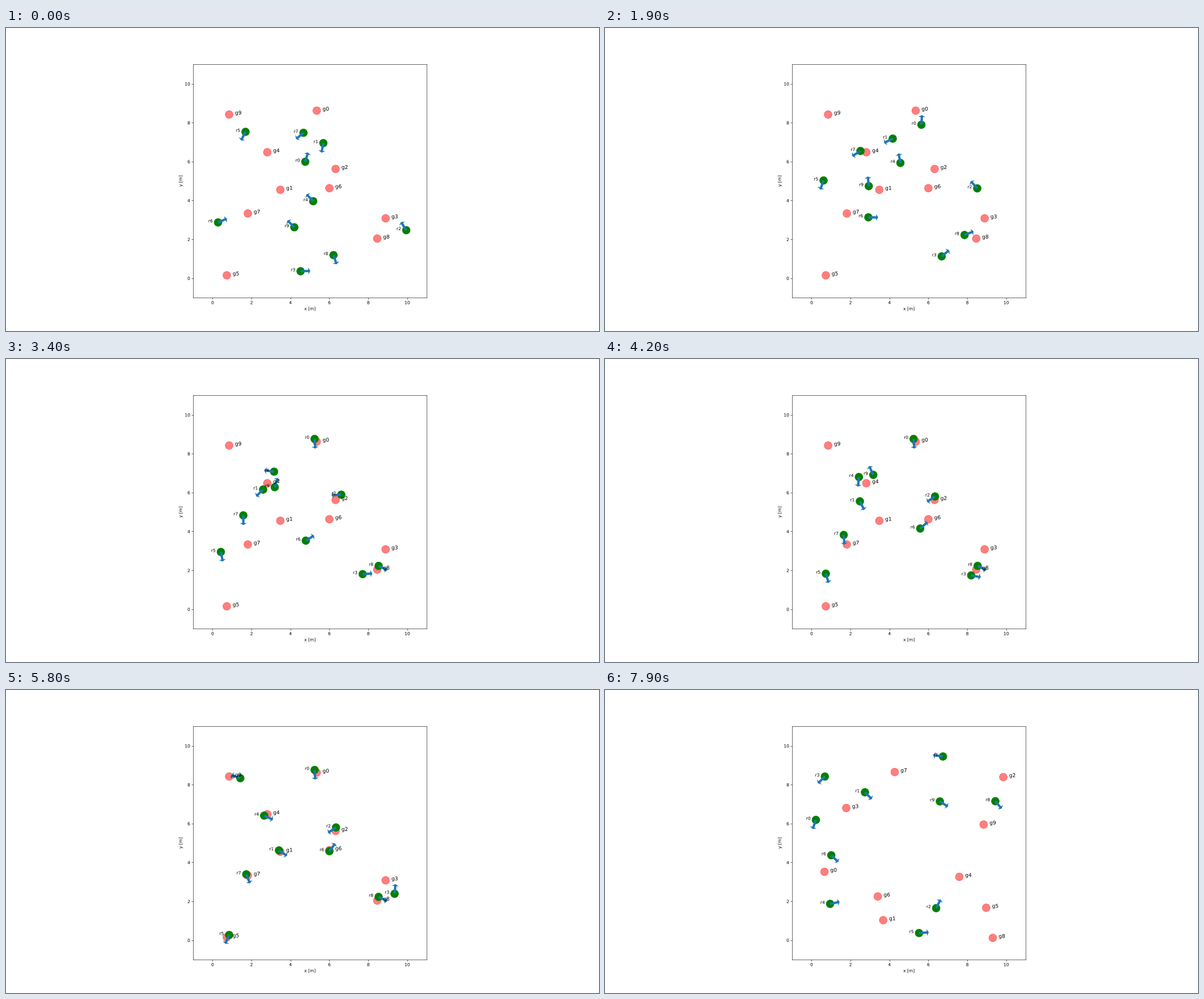
Write a matplotlib script that moves like this. It is 1046 px wide and 535 px high and loops after 8000 ms.

```python
import numpy as np
import matplotlib.pyplot as plt
from matplotlib.animation import FuncAnimation
from matplotlib.patches import Circle, Polygon
from matplotlib.patheffects import Normal
from matplotlib.text import Text

W, H, DPI = 1046, 535, 54.48
FRAMES, STEP = 80, 100
RESET = 75             # frame at which the second round starts
SPEED = 0.14           # metres per frame
KEYS = 0, 9, 27, 42, 58   # frames at which every moving robot passes its points
MIN_STOP = 4           # shortest final leg, in frames

RADIUS, ARROW_LEN, ARROW_WIDTH = 0.2, 0.5, 0.6

plt.rcParams.update({"font.family": "DejaVu Sans", "text.hinting": "no_hinting"})


def unit(deg):
    a = np.radians(deg)
    return np.array([np.cos(a), np.sin(a)])


def spline_slopes(t, p, first, last):
    """Velocities at the knots of a C2 cubic spline with fixed end velocities."""
    n = len(t)
    w = 1 / np.diff(t)
    pull = 3 * np.diff(p, axis=0) * w[:, None] ** 2
    a, b = np.eye(n), np.zeros((n, 2))
    b[0], b[-1] = first, last
    for i in range(1, n - 1):
        a[i, i - 1:i + 2] = w[i - 1], 2 * (w[i - 1] + w[i]), w[i]
        b[i] = pull[i - 1] + pull[i]
    return np.linalg.solve(a, b)


def drive(start, turn_from, *via, stop, turn_to):
    """Smooth drive that leaves and arrives with the given headings, then waits."""
    p = np.array([start, *via, stop], float)
    t = np.array(KEYS[:len(p) - 1], float)
    last_leg = np.hypot(*(p[-1] - p[-2])) / SPEED
    t = np.append(t, t[-1] + max(last_leg, MIN_STOP))
    v = spline_slopes(t, p, SPEED * unit(turn_from), SPEED * unit(turn_to))

    def pose(frame):
        frame = min(frame, t[-1])
        i = min(np.searchsorted(t, frame, side="right") - 1, len(t) - 2)
        h = t[i + 1] - t[i]
        u = (frame - t[i]) / h
        step, m, n = p[i + 1] - p[i], h * v[i], h * v[i + 1]
        c2, c3 = 3 * step - 2 * m - n, m + n - 2 * step
        dx, dy = m + u * (2 * c2 + 3 * u * c3)
        return p[i] + u * (m + u * (c2 + u * c3)), np.degrees(np.arctan2(dy, dx))

    return pose


def straight(x, y, heading):
    """Straight drive that reaches (x, y) on the last frame."""
    def pose(frame):
        return (x, y) - SPEED * (FRAMES - 1 - frame) * unit(heading), heading

    return pose


goals_a = [(5.35, 8.62), (3.48, 4.55), (6.32, 5.62), (8.89, 3.08), (2.81, 6.48),
           (0.73, 0.15), (6.00, 4.63), (1.81, 3.33), (8.46, 2.04), (0.85, 8.42)]
robots_a = [
    drive((4.76, 5.99), 74, (5.27, 6.67), (5.43, 8.80), stop=(5.24, 8.76), turn_to=274),
    drive((5.69, 6.95), 259, (5.20, 7.22), (3.24, 6.61), (2.48, 5.55),
          stop=(3.41, 4.62), turn_to=326),
    drive((9.95, 2.47), 122, (9.35, 3.50), (7.58, 5.46), stop=(6.34, 5.80), turn_to=214),
    drive((4.52, 0.36), 2, (5.64, 0.48), (7.32, 1.65), (8.20, 1.74), (9.35, 2.39),
          stop=(9.06, 3.16), turn_to=170),
    drive((5.17, 3.96), 134, (4.67, 4.84), (4.11, 6.70), (2.43, 6.80),
          stop=(2.65, 6.41), turn_to=335),
    drive((1.69, 7.53), 243, (1.19, 6.39), (0.35, 3.91), (0.73, 1.83),
          stop=(0.85, 0.27), turn_to=246),
    drive((0.28, 2.87), 23, (1.45, 3.14), (4.02, 3.21), (5.58, 4.15),
          stop=(6.00, 4.58), turn_to=53),
    drive((4.67, 7.48), 220, (3.76, 7.08), (1.75, 5.76), (1.65, 3.82),
          stop=(1.73, 3.39), turn_to=292),
    drive((6.21, 1.19), -71, (6.67, 1.25), stop=(8.53, 2.23), turn_to=-27),
    drive((4.20, 2.62), 135, (3.36, 3.50), (2.99, 5.68), (3.17, 6.91),
          stop=(1.04, 8.44), turn_to=170),
]

goals_b = [(0.66, 3.52), (3.68, 1.03), (9.85, 8.39), (1.78, 6.80), (7.59, 3.26),
           (8.97, 1.67), (3.40, 2.25), (4.27, 8.65), (9.31, 0.12), (8.84, 5.95)]
robots_b = [
    straight(0.22, 6.19, 251), straight(2.74, 7.61, -45), straight(6.40, 1.65, 63),
    straight(0.68, 8.42, 225), straight(0.95, 1.87, 12), straight(5.52, 0.37, 4),
    straight(1.01, 4.37, -44), straight(6.75, 9.45, 172), straight(9.44, 7.15, -50),
    straight(6.59, 7.14, -33),
]

fig = plt.figure(figsize=((W + .01) / DPI, (H + .01) / DPI), dpi=DPI, facecolor="white")
ax = fig.add_subplot()
ax.set(aspect="equal", xlim=(-1, 11), ylim=(-1, 11), xlabel="x [m]", ylabel="y [m]",
       xticks=range(0, 11, 2), yticks=range(0, 11, 2))

# Arrow along +x, from tail to tip on one side and mirrored on the other
side = np.array([(0, .1), (.8, .1), (.8, .3), (1, 0)])
arrow_shape = np.vstack([side, side[-2::-1] * (1, -1)]) * (ARROW_LEN, ARROW_WIDTH)


def add_disc(name, size, **style):
    disc = ax.add_patch(Circle((0, 0), RADIUS, **style))
    return disc, ax.text(0, 0, name, fontsize=size)


def place(disc, label, x, y, shift):
    disc.center = x, y
    label.set_position((x + shift, y))


goals = [add_disc(f"g{i}", 12, color="red", alpha=0.5) for i in range(10)]
robots = []
for i in range(10):
    item = add_disc(f"r{i}", 10, color="green")
    arrow = ax.add_patch(Polygon(arrow_shape, facecolor="C0", edgecolor="none"))
    robots.append((item, arrow))

# Drawing text as outlines keeps it at sub-pixel positions
for text in fig.findobj(Text):
    text.set_path_effects([Normal()])


def draw(frame):
    first = frame < RESET
    for item, (x, y) in zip(goals, goals_a if first else goals_b):
        place(*item, x, y, 0.3)
    for (item, arrow), pose in zip(robots, robots_a if first else robots_b):
        (x, y), heading = pose(frame)
        c, s = unit(heading)
        place(*item, x, y, -0.5)
        arrow.set_xy(arrow_shape @ np.array([(c, s), (-s, c)]) + (x, y))
    return []


anim = FuncAnimation(fig, draw, frames=FRAMES, init_func=lambda: draw(0),
                     interval=STEP, repeat=True, repeat_delay=0)
plt.show()
```
